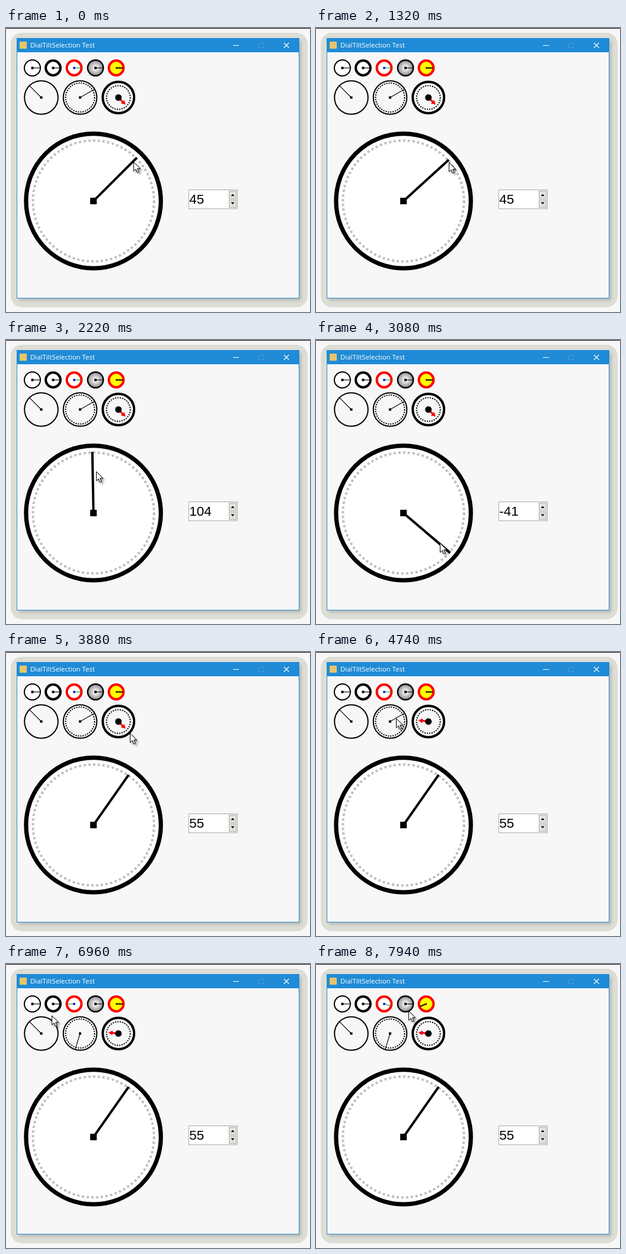
Write an HTML page that moves like this. It is 513 px wide and 480 px high and loops after 8 s.

```html
<!DOCTYPE html>
<html lang="en">
<head>
<meta charset="utf-8">
<title>Angle dials</title>
<style>
  html, body { margin: 0; width: 100%; height: 100%; overflow: hidden; background: #f7f7f7; }
  svg { display: block; width: 513px; height: 480px; }
  .ring { fill: none; }
  .title { font: 11.4px "Open Sans", "Noto Sans", sans-serif; fill: #fff; }
  .value { font: 22.5px "Liberation Sans", Arial, sans-serif; }
  .btn { fill: #e1e1dd; stroke: #adada8; }
  #pointer { filter: drop-shadow(3px 3px 1.5px rgba(0, 0, 0, .35)); }
</style>
</head>
<body>
<svg viewBox="0 0 513 480" xmlns="http://www.w3.org/2000/svg">
  <defs>
    <radialGradient id="steel">
      <stop offset=".1" stop-color="#fff"/>
      <stop offset="1" stop-color="#8a8a8a"/>
    </radialGradient>
    <filter id="soft" x="-5%" y="-5%" width="110%" height="110%"><feGaussianBlur stdDeviation="2.5"/></filter>
  </defs>

  <!-- window -->
  <rect width="513" height="480" fill="#f7f7f7"/>
  <rect width="513" height="1" fill="#000"/>
  <rect x="8" y="8" width="501" height="464" rx="19" fill="#dcddd5"/>
  <rect x="22" y="22" width="476" height="438" fill="#000" opacity=".18" filter="url(#soft)"/>
  <rect x="18.5" y="17.5" width="476" height="439" fill="#f7f7f7" stroke="#2a8dd8"/>
  <rect x="18" y="17" width="477" height="24" fill="#1f8bd6"/>
  <rect x="23" y="23" width="12" height="12" fill="#e9c46a"/>
  <text class="title" x="41" y="33">DialTiltSelection Test</text>
  <g fill="none" stroke="#fff">
    <path d="M383 29.5h10"/>
    <rect x="426.5" y="25.5" width="8" height="8" stroke="#4c9fd6"/>
    <path d="M469 25l8.5 8.5m0-8.5l-8.5 8.5" stroke-width="1.2"/>
  </g>

  <g id="dials"></g>

  <!-- number box -->
  <rect x="308.5" y="273.5" width="82" height="32" fill="#fff" stroke="#a9ada3"/>
  <rect class="btn" x="376.5" y="275.5" width="12" height="13"/>
  <rect class="btn" x="376.5" y="290.5" width="12" height="13"/>
  <path d="M379.5 284h6l-3-3.5zM379.5 294.5h6l-3 3.5z"/>
  <text id="value" class="value" x="309.3" y="297.3"></text>

  <path id="pointer" d="M.5 .5V16l3.7-3.4 2.6 6 2.5-1.1-2.6-5.8h5z" fill="#fff" stroke="#000"/>
</svg>
<script>
const LOOP = 8000, STEP = 60;
const HAND_LAG = 30, TEXT_LAG = 90;
const $ = id => document.getElementById(id);

const tiny = { y: 67.5, r: 12.4, w: 4, len: 12, hub: 4, fill: '#fff' };
const medium = { y: 117.5, r: 28.3, w: 2, len: 28, hub: 4 };
const thin = { ...tiny, x: 44.5, r: 13.5, w: 2, len: 13 };
const bold = { ...tiny, x: 79.5 };
const red = { ...tiny, x: 115, ring: '#f00', hand: '#0a0', dot: '#00f', round: true };
const steel = { ...tiny, x: 151, r: 13.2, w: 2.4, fill: 'url(#steel)' };
const yellow = { ...tiny, x: 186, len: 11, hub: 2, thick: 2, ring: '#f00', fill: '#ff0' };
const plain = { ...medium, x: 59.5, angle: 135 };
const dotted = { ...medium, x: 125, angle: 30, dots: [24.5, 2] };
const arrow = { ...medium, x: 189.7, r: 26.5, w: 4, len: 17, hub: 11, angle: -45, dots: [20, 2], arrow: true, round: true };
const big = { x: 147.6, y: 292.4, r: 113.7, w: 7.2, len: 103.5, hub: 11, angle: 45,
  dots: [102.2, 4], dotColor: '#c0c0c0', thick: 4, fill: '#fff' };
const dials = [thin, bold, red, steel, yellow, plain, dotted, arrow, big];

function drawDial(d) {
  const { x, y, r, w, len, hub, fill = '#f7f7f7', ring = '#000', hand = '#000', dot = '#000', thick = 1.1 } = d;
  const circle = (radius, color, width, dash = 'none') =>
    `<circle class="ring" r="${radius}" stroke="${color}" stroke-width="${width}" stroke-dasharray="${dash}"/>`;
  const dots = d.dots ? circle(d.dots[0], d.dotColor || '#000', d.dots[1], d.dots[1]) : '';
  const needle = d.arrow
    ? `<path d="M0-1.5H${len - 7}V-4L${len} 0L${len - 7} 4V1.5H0z" fill="#f00"/>`
    : `<path d="M0 0H${len}" stroke="${hand}" stroke-width="${thick}"/>`;
  const center = d.round
    ? `<circle r="${hub / 2}" fill="${dot}"/>`
    : `<rect x="${-hub / 2}" y="${-hub / 2}" width="${hub}" height="${hub}" fill="${dot}"/>`;
  return `<g transform="translate(${x} ${y})"><circle r="${r}" fill="${fill}"/>${dots}
    ${circle(r, ring, w)}<g class="hand">${needle}</g>${center}</g>`;
}
$('dials').innerHTML = dials.map(drawDial).join('');
const hands = document.querySelectorAll('.hand');

// The pointer orbits a dial from angle a[0] to a[1] through evenly spaced radii r;
// glide is the time it takes to travel there first.
const START = [215, 226];
const drags = [
  { dial: big, glide: [540, 920], from: 1260, to: 2315, a: [43, -280], r: [101, 78, 70] },
  { dial: big, from: 2540, to: 3000, a: [-280, -40.5], r: [70, 80] },
  { dial: big, from: 3060, to: 3360, a: [-40.5, 55], r: [80, 79] },
  { dial: arrow, glide: [3640, 3880], from: 4040, to: 4740, a: [-45, 174], r: [28, 75, 56, 55] },
  { dial: dotted, glide: [4880, 5000], from: 5160, to: 5980, a: [30, 279], r: [33, 45, 72, 60, 52] },
  { dial: dotted, from: 5980, to: 6160, a: [279, 253], r: [52, 43] },
  { dial: red, glide: [6160, 6460], from: 6620, to: 7220, a: [0, 342], r: [16, 11, 45, 40, 26] },
  { dial: yellow, glide: [7220, 7440], from: 7440, to: 7740, a: [0, -190], r: [6, 17, 24, 52] },
  { dial: yellow, from: 7760, to: 7900, a: [-190, -158], r: [52, 32] }
];

// times at which a run of screen updates begins
const runs = [0, 600, 920, 1320, 2600, 3700, 4080, 4940, 5200, 6660, 7940];

const mix = (a, b, p) => a + (b - a) * p;

function ease(t, from, to) {
  const p = Math.max(0, Math.min(1, (t - from) / (to - from)));
  return (1 - Math.cos(Math.PI * p)) / 2;
}

function along(list, p) {
  const i = Math.min(list.length - 2, Math.floor(p * (list.length - 1)));
  return mix(list[i], list[i + 1], p * (list.length - 1) - i);
}

function orbit({ dial, a, r }, p) {
  const angle = mix(...a, p) * Math.PI / 180, radius = along(r, p);
  return [dial.x + radius * Math.cos(angle), dial.y - radius * Math.sin(angle)];
}

function pointerAt(t) {
  const i = drags.findLastIndex(d => (d.glide ? d.glide[0] : d.from) <= t);
  if (i < 0) return START;
  const d = drags[i];
  if (t >= d.from) return orbit(d, ease(t, d.from, d.to));
  const home = i ? orbit(drags[i - 1], 1) : START;
  const p = ease(t, ...d.glide);
  return orbit(d, 0).map((v, n) => mix(home[n], v, p));
}

function angleAt(dial, t) {
  const d = drags.findLast(d => d.dial === dial && d.from <= t);
  return d ? mix(...d.a, ease(t, d.from, d.to)) : dial.angle || 0;
}

function snap(t) {
  const start = runs.findLast(s => s <= t);
  return start + STEP * Math.floor((t - start) / STEP);
}

function render(now) {
  const t = snap(now % LOOP);
  dials.forEach((d, i) => hands[i].setAttribute('transform', `rotate(${-angleAt(d, t - HAND_LAG)})`));
  const deg = Math.round(angleAt(big, t - TEXT_LAG));
  $('value').textContent = deg <= -180 ? deg + 360 : deg;
  $('pointer').setAttribute('transform', `translate(${pointerAt(t).map(Math.round)})`);
}

let origin;
function tick(now) {
  origin ??= now;
  render(now - origin);
  requestAnimationFrame(tick);
}
render(0);
requestAnimationFrame(tick);
</script>
</body>
</html>
```
